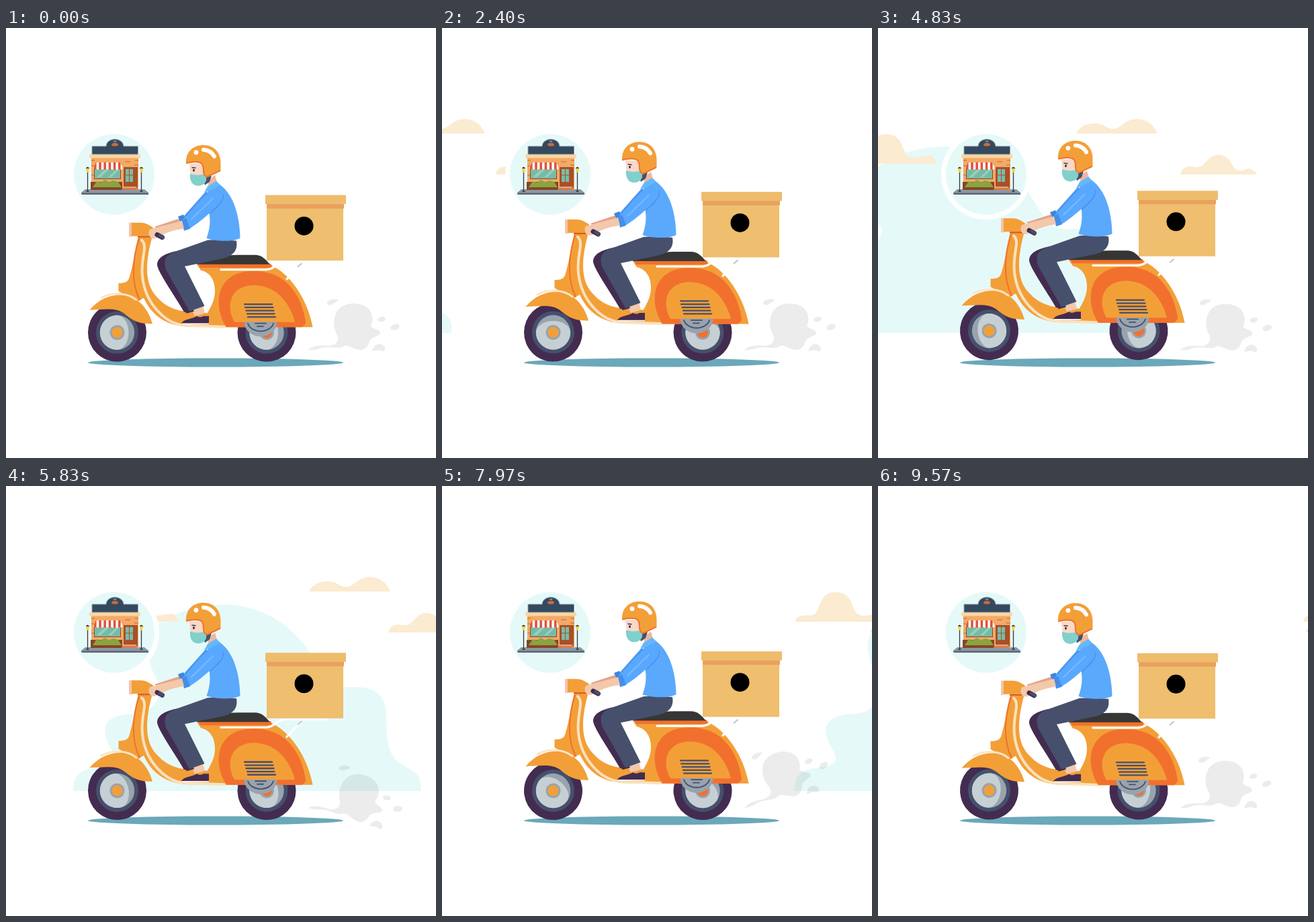
Recreate the animation shown at these times as an HTML page. Size 640 by 640 pixels, loop 9610 ms.

```html
<!DOCTYPE html>
<html lang="en">
<head>
<meta charset="utf-8">
<title>Scooter delivery</title>
<style>
  html, body { margin: 0; width: 100%; height: 100%; overflow: hidden; background: #fff; }
  svg { display: block; width: 100vw; height: 100vh; }
  .line { fill: none; stroke-linecap: round; stroke-linejoin: round; }
  .cloud { fill: #faebd1; }
</style>
</head>
<body>
<svg viewBox="0 0 640 640">
  <defs>
    <g id="wheel">
      <circle r="43.5" fill="#432c50"/>
      <circle r="31.5" fill="#46506c"/>
      <circle r="25.7" fill="#98a3ae"/>
      <path d="M0-25.7A25.7 25.7 0 0 0 0 25.7A17 25.7 0 0 0 0-25.7" fill="#c6d0d4"/>
      <circle r="11" fill="#98a3ae"/>
    </g>
    <g id="lamp">
      <path d="M0 214V244M-2 243H2" stroke="#303642" stroke-width="1.3"/>
      <path d="M-2.5 209H2.5L1.5 215H-1.5Z" fill="#f7d245"/>
      <path d="M-3 209L0 206.500L3 209Z" fill="#303642"/>
    </g>
    <pattern id="stripes" x="131" y="200" width="7.200" height="12" patternUnits="userSpaceOnUse">
      <rect width="7.200" height="12" fill="#fff"/>
      <rect width="3.600" height="12" fill="#e2533c"/>
    </pattern>
  </defs>

  <path id="hills" fill="#e6f9f9" d="M95 454C95 446 95 430 112 423C128 417 152 421 156 408C158 394 142 385 142 364C142 346 160 340 184 339C208 338 222 322 227 300C214 282 204 258 204 235C206 201 268 175 325 176.500C382 179 424 212 447 248C468 284 478 299 500 299.500C530 298 561 300 561 342C561 372 562 396 577 409C592 422 612 424 612 445V454Z"/>

  <path id="cloudB" class="cloud" d="M0 218C2 207 12 205 22 207C38 210 38 189 57 189C76 189 76 210 87 212C96 214 97 207 105 210C110 212 113 215 114 218Z"/>
  <path id="cloudC" class="cloud" d="M0 202C3 189 16 194 26 192C39 188 33 158 60 158C87 158 83 184 92 190C103 197 114 190 124 190C131 190 134 196 135 202Z"/>

  <circle cx="161" cy="218" r="67" fill="#fff"/>
  <circle cx="161" cy="218" r="60" fill="#e6f9f9"/>
  <g id="shop">
    <path d="M118 240H206L212 245V248H112V245Z" fill="#8d97a3"/>
    <path d="M112 245.500H212V248H114Z" fill="#5c6676"/>
    <rect x="127" y="192" width="70" height="49" fill="#f3a967"/>
    <path d="M127 197h5m-5 8h4m-4 14h4m61-22h5m-6 7h6m-20-5h8m-8 39h18" stroke="#dd8748" stroke-width="2"/>
    <rect x="124" y="188" width="76" height="5.500" fill="#fcd6a0"/>
    <path d="M128 176H149A13 10.500 0 0 1 175 176H196.500V188H128Z" fill="#34495e" stroke="#8fa2b1" stroke-width="1"/>
    <ellipse cx="162" cy="173.500" rx="5" ry="2.500" fill="#c96a3d"/>
    <text x="162" y="170" font-family="Roboto, sans-serif" font-size="4" fill="#fff" text-anchor="middle">fd</text>
    <rect x="131" y="208" width="40" height="17" fill="#8b4b2b"/>
    <rect x="132" y="208" width="38" height="16" fill="#77bba6"/>
    <path d="M135 222L149 209H155L141 222ZM152 222L164 211H168L157 222Z" fill="#97cfbb"/>
    <path d="M134 200H170L174 209Q171 212 169 210Q166 212 163 210Q160 212 157 210Q154 212 151 210Q148 212 145 210Q142 212 139 210Q134 212 130 209Z" fill="url(#stripes)"/>
    <rect x="126" y="229" width="47" height="12" fill="#874524"/>
    <path d="M129 237L135 228L141 230L147 226L153 229L160 227L167 229L172 237Z" fill="#89a441"/>
    <rect x="175" y="207" width="21" height="32" fill="#a85028"/>
    <path d="M178 210H189V229H178Z" fill="#78bda9"/>
    <path d="M183.500 210V229M178 219H189" stroke="#a85028"/>
    <path d="M174 236H195V241H172Z" fill="#d77b4c"/>
    <path d="M173 237H193" stroke="#f7d4ad"/>
    <use href="#lamp" x="121.500"/>
    <use href="#lamp" x="201.500"/>
  </g>
  <path id="cloudA" class="cloud" d="M0 157C4 149 12 142 27 142C43 142 47 152 58 150C68 148 73 136 90 135.500C108 136 116 146 121 157Z"/>

  <ellipse cx="312" cy="498" rx="190" ry="6.500" fill="#6aa8ba"/>

  <g id="wheels">
    <use href="#wheel" class="spin" data-x="165.500"/>
    <use href="#wheel" class="spin" data-x="388"/>
    <circle cx="165.500" r="8" fill="#f39f38"/>
    <circle cx="388" r="8" fill="#f2702d"/>
  </g>

  <g id="rider">
    <!-- rear body -->
    <path d="M284 352H392C424 366 449 405 456.500 445.500H302C301 430 299 425 300 424C307 412 311 403 311 391C311 374 302 363 290 361Z" fill="#f39f38"/>
    <path d="M328 445.500C308 415 310 362 369 362C422 362 441 405 446 438Q446 442 440 445.500Z" fill="#f2702d"/>
    <path d="M340 438C326 413 334 383 370 383C402 384 422 408 430 438Z" fill="#f39f38"/>
    <path class="line" d="M355 411.500H396M356 416.300H397.500M357.500 421H398.500M359 425.800H399.500M360 430.500H401" stroke="#46506c" stroke-width="2.300"/>
    <path d="M286 351H394L397 357H289Z" fill="#f2702d"/>
    <path class="line" d="M320 360H388Q395 359 400 355Q407 349.500 414 348H477M418 374L440 351" stroke="#fff" stroke-width="3.200"/>
    <path d="M434 356L440.500 350.500" stroke="#c8c8cb" stroke-width="2.200"/>
    <path d="M284 351C300 342 324 338 345 338H370C382 338 386 345 393 352H284Z" fill="#363735"/>

    <!-- engine -->
    <path d="M354.500 437.500A24.500 22 0 0 0 403.500 437.500Z" fill="#98a3ae"/>
    <path class="line" d="M360 440A19.500 15 0 0 0 398 440M371 440H387M374 444.500H383" stroke="#46506c" stroke-width="1.800"/>

    <!-- front shield and floor -->
    <path d="M197 310H218C206 352 207 382 224 400C238 416 257 424 280 422L302 425L306 445H270C240 443 218 430 205 402L194 408L167.500 392V380C178 380 182 378 184 370C190 350 192 330 197 310Z" fill="#f39f38"/>
    <path class="line" d="M198 314C188 344 186 380 199 405" stroke="#f2702d" stroke-width="2"/>
    <path d="M124.500 420C140 402 158 396 178 398C202 403 214 425 218 440.500C200 441 190 437 178 427C164 415 145 420 124.500 420Z" fill="#f39f38"/>
    <path class="line" d="M142 402C158 393 181 394 194 405" stroke="#fbe6c9" stroke-width="3"/>
    <path class="line" d="M202 316C212 325 200 342 203 370C207 410 237 442 268 443L325 445" stroke="#fbe1bd" stroke-width="4"/>

    <!-- handlebar -->
    <path d="M183 290H188V311H183Z" fill="#f5c3ab"/>
    <path d="M187 290H200C210 290 214 295 219 297L216 310H187Z" fill="#f39f38"/>
    <path d="M196 311H216" stroke="#d5562b" stroke-width="2"/>

    <!-- legs -->
    <path d="M276 419L293 412L296 425L281 429Z" fill="#f3c8ab"/>
    <path d="M266 422L278 418L280 422L269 425Z" fill="#432c50"/>
    <path d="M261 440C264 433 277 434 284 429Q289 432 294 429H302V440Z" fill="#432c50"/>
    <path d="M262 440.500H302" stroke="#fff" stroke-width="1.500"/>
    <path d="M266 330C240 334 225 340 225 353C227 365 247 392 265 423L276 421L240 360C235 345 244 338 270 333Z" fill="#432c50"/>
    <path d="M300 316C320 315 334 316 343 317C346 335 334 342 315 345L266 355L295.500 414L273 422L238 360C234 345 238 338 252 333Z" fill="#46506c"/>

    <!-- arms and shirt -->
    <path d="M221 296L258 284L264 291L228 301Z" fill="#e7a28d"/>
    <path d="M256 281L264 278L270 287L260 290Z" fill="#3d86dd"/>
    <path d="M265 280L297 244L306 247L274 288Z" fill="#4b95ef"/>
    <path d="M300 239L314 231C336 242 348 276 348.500 313C338 319 310 318 298.500 313C303 300 305 291 302 270Z" fill="#5aa9fc"/>
    <path d="M324 247C325 260 316 266 303 278L302 270Z" fill="#4992ef"/>
    <path d="M307 241C320 237 328 247 319 260C305 275 290 288 273 299L263 285C278 272 290 252 307 241Z" fill="#59a8ff"/>
    <path class="line" d="M276 285L308 254" stroke="#7abaff" stroke-width="2"/>
    <path d="M261 287L268 283L274 299L265 302Z" fill="#438ee9"/>
    <path d="M214 300C226 296 242 293 262 287L265 299C248 301 237 306 223 313C215 316 210 308 214 300Z" fill="#f3c8ab"/>
    <path class="line" d="M225 308L232.500 312" stroke="#432c50" stroke-width="7"/>
    <path d="M228 306L236 311L234 315L226 310Z" fill="#46506c"/>

    <!-- head -->
    <path d="M300 228L311 219L314 230L302 238Z" fill="#efb79c"/>
    <path d="M295 245L300 236L313 228L319 234L302 243Z" fill="#63b8fb"/>
    <path d="M273 202H293L297 222L277 224L274 214Z" fill="#f9d8c8"/>
    <path class="line" d="M277 208L282 208.500" stroke="#46314a" stroke-width="1.500"/>
    <ellipse cx="279.500" cy="212" rx="1.400" ry="2" fill="#332b43"/>
    <path d="M293 224L306 220L303 229L296 234Z" fill="#46506c"/>
    <path d="M274 217C282 220 289 219 294 218L298 223C300 231 291 236 284 235C277 234 273 227 274 217Z" fill="#80d0cc"/>
    <path d="M268 202C267 185 278 174.500 294 174.500C311 174.500 319.500 187 319.500 201V213L299 223C290 219 296 207 290 202C284 199 274 201 268 202Z" fill="#f39f38"/>
    <path class="line" d="M269 201.500C277 199 288 199 291 202C297 207 290 218 299 222L318 213" stroke="#f2702d" stroke-width="2"/>
    <circle cx="283" cy="185.500" r="3.400" fill="#fff"/>
    <path class="line" d="M294 181.500C302 182 307 186 310 191.500" stroke="#fff" stroke-width="6"/>

    <!-- parcel -->
    <rect x="388" y="262" width="114" height="84.500" fill="#efbe6e"/>
    <rect x="388" y="262" width="115" height="7" fill="#e9a15f"/>
    <rect x="386" y="249" width="120" height="13.500" fill="#efbc6c"/>
    <circle cx="443.500" cy="295" r="14" fill="#000"/>
  </g>

  <g id="smoke" fill-opacity=".075">
    <path d="M450 479C458 472 470 472 480 473C494 472 497 463 491 453C484 438 488 410 517 410C545 410 549 432 543 443C546 449 557 448 557 454C557 459 546 458 541 466C538 476 533 480 525 479C515 477 508 470 502 474C495 479 482 473 470 476C462 479 455 480 450 479Z"/>
    <path d="M478 410C478 404 486 403 494 404C496 407 489 408 487 411C483 413 479 413 478 410Z"/>
    <ellipse cx="559" cy="433.500" rx="6" ry="3.700" transform="rotate(-12 559 433.500)"/>
    <ellipse cx="579" cy="445" rx="7" ry="4.300" transform="rotate(-20 579 445)"/>
    <path d="M545 480C548 469 560 467 564 476C565 482 560 482 557 480C552 478 548 482 545 480Z"/>
  </g>
</svg>
<script>
  const LOOP = 9610;
  const BOUNCE = LOOP / 5;
  const TAU = Math.PI * 2;
  const $ = id => document.getElementById(id);
  const spinning = [...document.querySelectorAll('.spin')];

  // Each backdrop piece eases from one side of the stage to the other.
  const drifters = [
    { id: 'cloudB', start: 0, span: 7150, from: -119, to: 637 },
    { id: 'cloudA', start: 1040, span: 7150, from: -131, to: 650 },
    { id: 'cloudC', start: 3605, span: 5700, from: -140, to: 633 },
    { id: 'hills', start: 1855, span: 7600, from: -615, to: 545 }
  ];

  const move = (element, transform) => element.setAttribute('transform', transform);
  const easeInOut = p => p * p * (3 - 2 * p);

  function draw(now) {
    const t = now % LOOP;
    const phase = t / BOUNCE;

    for (const { id, start, span, from, to } of drifters) {
      const p = Math.min(1, Math.max(0, (t - start) / span));
      move($(id), `translate(${from + (to - from) * easeInOut(p)} 0)`);
    }

    const lift = 3.6 * (1 - Math.cos(TAU * (phase + 0.07)));
    move($('rider'), `translate(0 ${-lift})`);
    move($('wheels'), `translate(0 ${452 + 1.6 * Math.cos(TAU * (phase - 0.11))})`);
    for (const wheel of spinning) {
      move(wheel, `translate(${wheel.dataset.x} 0) rotate(${-360 * phase})`);
    }

    const swing = 16 * Math.sin(TAU * t / (LOOP / 2));
    move($('smoke'), `rotate(${swing} 451 478)`);
    requestAnimationFrame(draw);
  }
  requestAnimationFrame(draw);
</script>
</body>
</html>
```
